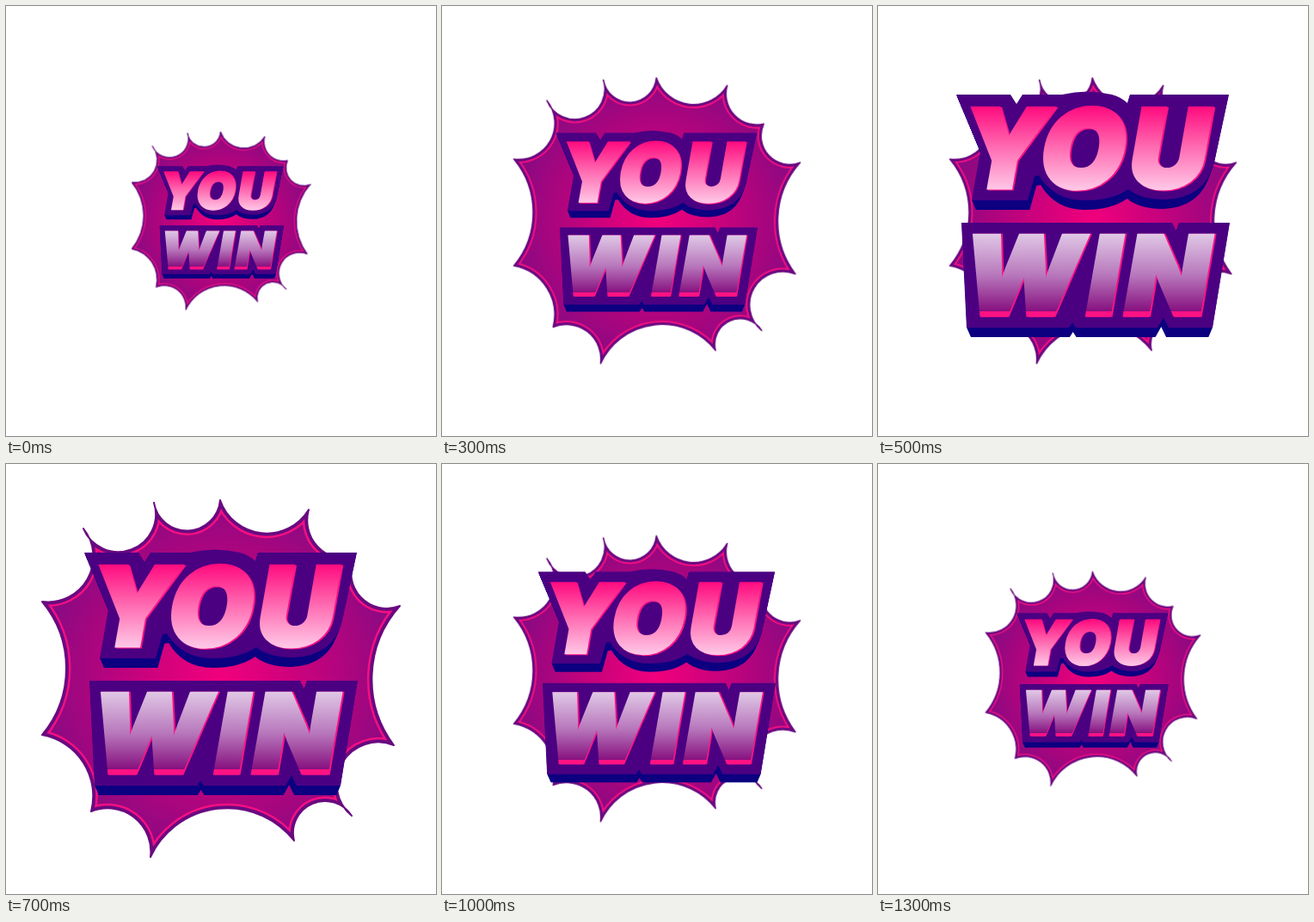
Write an HTML page that moves like this. It is 500 px wide and 500 px high and loops after 1400 ms.

```html
<!DOCTYPE html>
<html lang="en">
<head>
<meta charset="utf-8">
<title>You win</title>
<style>
  html, body { margin: 0; width: 100%; height: 100%; overflow: hidden; background: #fff; }
  svg { display: block; width: 100%; height: 100%; }
  #burst, #words { transform-origin: 0 0; }
  text { font: 900 126px Inter, "Noto Sans", sans-serif; text-anchor: middle; stroke-width: 5; }
  .pink { fill: #ff1283; stroke: #ff1283; }
  .you { fill: url(#rose); stroke: url(#rose); }
  .win { fill: url(#lilac); stroke: url(#lilac); }
</style>
</head>
<body>
<svg viewBox="0 0 500 500">
  <defs>
    <radialGradient id="glow" gradientUnits="userSpaceOnUse" cx="0" cy="0" r="205">
      <stop offset="0" stop-color="#f2007c"/>
      <stop offset=".45" stop-color="#c9027d"/>
      <stop offset=".8" stop-color="#a4067f"/>
      <stop offset="1" stop-color="#8c0a82"/>
    </radialGradient>
    <linearGradient id="rose" gradientUnits="userSpaceOnUse" x1="0" y1="-94" x2="0" y2="2">
      <stop offset="0" stop-color="#ff0a7e"/>
      <stop offset=".5" stop-color="#ff6cb2"/>
      <stop offset="1" stop-color="#ffc6e6"/>
    </linearGradient>
    <linearGradient id="lilac" gradientUnits="userSpaceOnUse" x1="0" y1="-94" x2="0" y2="2.5">
      <stop offset="0" stop-color="#e0c8e6"/>
      <stop offset=".5" stop-color="#b878bc"/>
      <stop offset=".94" stop-color="#86107f"/>
      <stop offset=".94" stop-color="#ff1283"/>
    </linearGradient>
    <clipPath id="inside"><path class="star"/></clipPath>
    <path id="youPlate" d="M91 103H154L161 114L168 103H214Q243 96 272 103Q283 106 290 113L293 103H408L391 182Q381 223 334 225Q306 225 291 213Q272 226 240 226Q205 226 187 197L182 198L174 226H109L119 169Z"/>
    <path id="winPlate" d="M97 252H342L347 262L350 252H409L389 374H338L332 362L325 374H230L226 368L222 374H103Z"/>
  </defs>

  <g id="burst">
    <path class="star" fill="url(#glow)"/>
    <g fill="none" stroke="#6a0a80" stroke-linejoin="round">
      <path class="star" stroke="#f50f82" stroke-width="11" clip-path="url(#inside)"/>
      <path class="star" stroke-width="6" clip-path="url(#inside)"/>
      <path class="star" stroke-width="2"/>
    </g>
  </g>

  <g id="words">
    <g id="depth" fill="#0c0080"></g>
    <use href="#youPlate" fill="#4b0082"/>
    <use href="#winPlate" fill="#4b0082"/>
    <g transform="translate(0 210.5) skewX(-10)">
      <text class="pink" aria-hidden="true" x="143 234 334" y="1">YOU</text>
      <text class="you" x="141 232 332">YOU</text>
    </g>
    <g transform="translate(0 358.5) skewX(-10)">
      <text class="pink" aria-hidden="true" x="164 258 332">WIN</text>
      <text class="win" x="162 256 330">WIN</text>
    </g>
  </g>
</svg>
<script>
const STEPS = 14, STEP_MS = 100;

// tips of the star, clockwise: x, y, depth of the arc to the next tip
const tips = [
  [90, 75, 42], [172, 45, 34], [249, 42, 33], [352, 53, 22], [405, 109, 26],
  [458, 165, 29], [451, 327, 41], [402, 409, 31], [335, 438, 47],
  [168, 457, 25], [99, 404, 23], [42, 315, 28], [42, 160, 33]
];

function starPath() {
  const at = ([x, y]) => `${x - 250} ${y - 250}`;
  return "M" + at(tips[0]) + tips.map((tip, i) => {
    const next = tips[(i + 1) % tips.length];
    const half = Math.hypot(next[0] - tip[0], next[1] - tip[1]) / 2;
    const r = (half * half + tip[2] ** 2) / (2 * tip[2]);
    return `A${r} ${r} 0 0 0 ${at(next)}`;
  }).join("") + "Z";
}

const outline = starPath();
document.querySelectorAll(".star").forEach(p => p.setAttribute("d", outline));

// The plates sink downwards and narrow slightly towards the middle.
for (let k = 11; k > 0; k--) {
  const s = 1 - 0.003 * k;
  for (const id of ["youPlate", "winPlate"]) {
    const u = document.createElementNS("http://www.w3.org/2000/svg", "use");
    u.setAttribute("href", "#" + id);
    u.setAttribute("transform", `translate(${249 * (1 - s)} ${k}) scale(${s} 1)`);
    document.getElementById("depth").append(u);
  }
}

// progress from 0 to 1 between steps a and b
const ramp = (i, a, b) => Math.min(1, Math.max(0, (i - a) / (b - a)));

function burstPose(i) {
  const s = 0.5 + 0.3 * ramp(i, 0, 3) + 0.2 * ramp(i, 5, 7) ** 1.3;
  return `translate(250px, 250px) scale(${s})`;
}

function wordsPose(i) {
  const late = ramp(i, 3, 5);
  const s = 0.463 + 0.274 * ramp(i, 0, 3) + 0.263 * late;
  return `translate(249px, ${251.5 - 7.5 * late}px) scale(${s}) translate(-249px, -244px)`;
}

// Grows for half the loop, then retraces its steps.
function play(id, pose) {
  const frames = Array.from({ length: STEPS + 1 }, (_, i) => ({
    transform: pose(Math.min(i, STEPS - i)), offset: i / STEPS, easing: "steps(1, end)"
  }));
  const a = document.getElementById(id).animate(frames, { duration: STEPS * STEP_MS, iterations: Infinity });
  a.startTime = document.timeline.currentTime;
}

play("burst", burstPose);
play("words", wordsPose);
</script>
</body>
</html>
```
